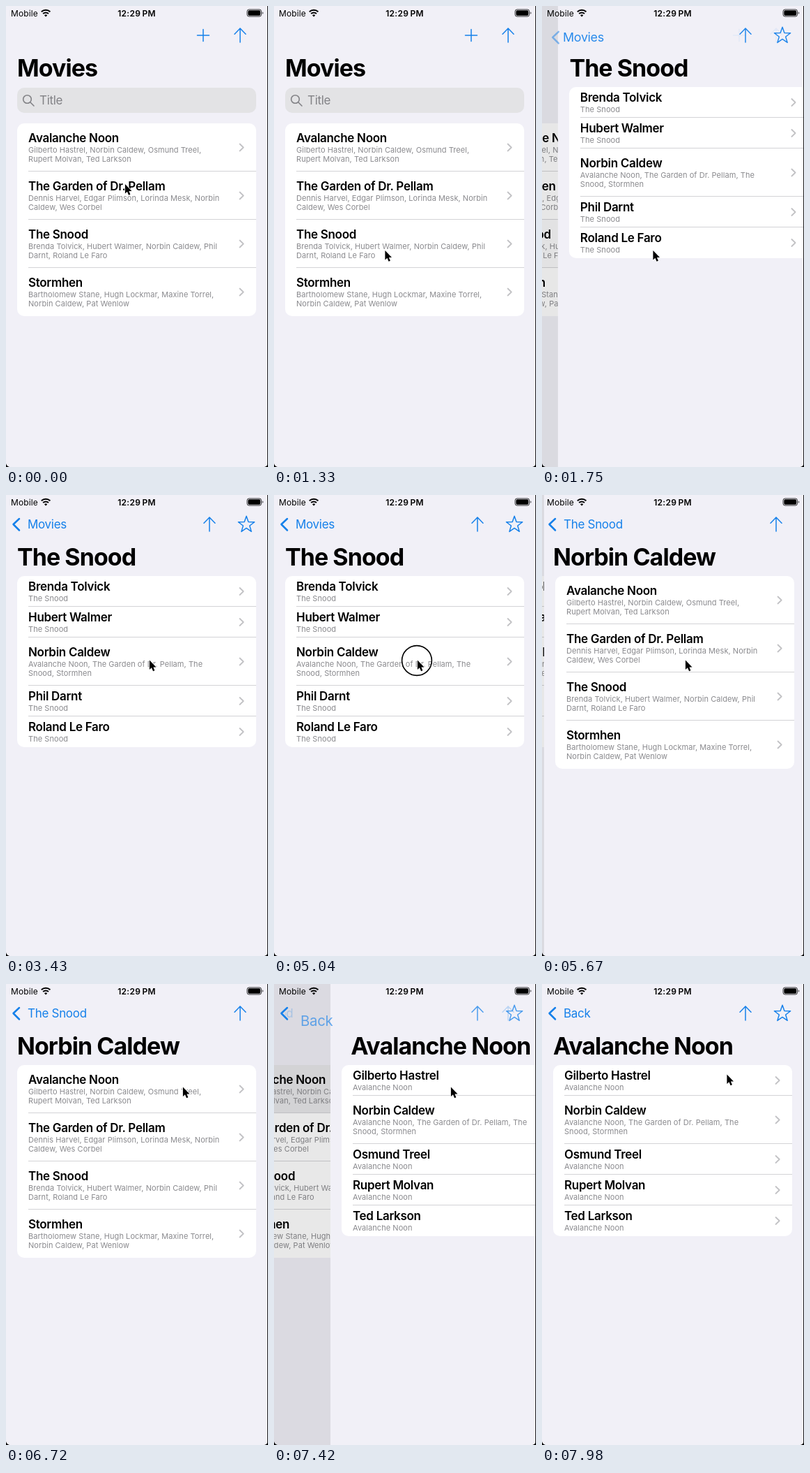
An HTML page that plays this animation: 376 by 660 pixels, repeating every 8000 ms.

```html
<!DOCTYPE html>
<html lang="en">
<head>
<meta charset="utf-8">
<title>Movie list</title>
<style>
  html, body { margin: 0; width: 100%; height: 100%; overflow: hidden; background: #f1f0f7; }
  svg { display: block; width: 376px; height: 660px; }
  text { font-family: Inter, Roboto, "Liberation Sans", sans-serif; font-optical-sizing: none; }
  .title { font-size: 34px; font-weight: 700; letter-spacing: -.95px; }
  .name { font-size: 17px; font-weight: 600; letter-spacing: -.3px; }
  .sub { font-size: 11px; fill: #8a8a8e; letter-spacing: .06px; }
  .label { font-size: 17px; fill: #1580ea; letter-spacing: -.3px; }
  .hint { font-size: 17px; fill: #828286; letter-spacing: -.3px; }
  .status { font-size: 12px; letter-spacing: .1px; }
  .line { fill: none; stroke: #1580ea; stroke-width: 1.5; stroke-linecap: round; stroke-linejoin: round; }
</style>
</head>
<body>
<svg id="stage" viewBox="0 0 376 660" xmlns="http://www.w3.org/2000/svg"></svg>
<script>
const LOOP = 8000, STEP = 70, WIDTH = 375;

const films = [
  ["Avalanche Noon", "Gilberto Hastrel, Norbin Caldew, Osmund Treel,", "Rupert Molvan, Ted Larkson"],
  ["The Garden of Dr. Pellam", "Dennis Harvel, Edgar Plimson, Lorinda Mesk, Norbin", "Caldew, Wes Corbel"],
  ["The Snood", "Brenda Tolvick, Hubert Walmer, Norbin Caldew, Phil", "Darnt, Roland Le Faro"],
  ["Stormhen", "Bartholomew Stane, Hugh Lockmar, Maxine Torrel,", "Norbin Caldew, Pat Wenlow"]
];
const lead = ["Norbin Caldew", "Avalanche Noon, The Garden of Dr. Pellam, The", "Snood, Stormhen"];
const cast = (film, names) => names.map(n => n === lead[0] ? lead : [n, film]);

// start: when the page is pushed; picked: row tapped on it; drift: label offset while shrinking
const pages = [
  { title: "Movies", start: -1e4, rows: films, top: 168, picked: 2, icons: [["plus", 283], ["arrow", 336]] },
  { title: "The Snood", start: 1560, top: 116, picked: 2, back: "Movies", drift: -15,
    rows: cast("The Snood", ["Brenda Tolvick", "Hubert Walmer", lead[0], "Phil Darnt", "Roland Le Faro"]),
    icons: [["arrow", 292], ["star", 345]] },
  { title: lead[0], start: 5379, rows: films, top: 116, picked: 0, back: "The Snood", drift: 0,
    icons: [["arrow", 336]] },
  { title: "Avalanche Noon", start: 7298, top: 116, back: "Back", drift: 28,
    rows: cast("Avalanche Noon", ["Gilberto Hastrel", lead[0], "Osmund Treel", "Rupert Molvan", "Ted Larkson"]),
    icons: [["arrow", 292], ["star", 345]] }
];

const taps = [
  { at: 1260, hold: 70, x: 158.5, y: 349.5 },
  { at: 5040, hold: 140, x: 205, y: 237 },
  { at: 7000, hold: 140, x: 253, y: 147 }
];
const moves = [
  { from: 0, to: 770, x: 159, y: 349.5 },
  { from: 2800, to: 3430, x: 205.5, y: 236 },
  { from: 6230, to: 6720, x: 253.5, y: 147 },
  { from: 7490, to: 7980, x: 265, y: 129 }
];

const text = (cls, x, y, s) => `<text class="${cls}" x="${x}" y="${y}">${s}</text>`;

function starPath() {
  const points = [];
  for (let i = 0; i < 10; i++) {
    const r = i % 2 ? 4.9 : 12.2, a = -Math.PI / 2 + i * Math.PI / 5;
    points.push((r * Math.cos(a)).toFixed(2) + " " + (r * Math.sin(a)).toFixed(2));
  }
  return "M" + points.join("L") + "Z";
}
const shapes = {
  plus: "M-8.5 0H8.5M0 -8.5V8.5",
  arrow: "M0 10V-10M-8 -1.8L0 -10L8 -1.8",
  star: starPath()
};
const icon = ([kind, x]) =>
  `<path class="line" d="${shapes[kind]}" transform="translate(${x} ${kind === "star" ? 42.5 : 42})"/>`;

function search() {
  return `<g id="search"><rect x="16" y="117" width="343" height="36" rx="10" fill="#e3e3e5"/>
    <g fill="none" stroke="#828286" stroke-width="1.6" stroke-linecap="round">
    <circle cx="30.5" cy="133.5" r="5.8"/><path d="M34.8 137.8L40 143"/></g>${text("hint", 48, 141, "Title")}</g>`;
}

function body(page, i) {
  let y = page.top, out = "", glow = "";
  page.rows.forEach(([name, ...subs], k) => {
    const tall = subs.length > 1, h = tall ? 69 : 44, base = y + (tall ? 27 : 21);
    if (k === page.picked) glow = `<rect class="glow" x="16" y="${y}" width="343" height="${h}" fill="#d1d1d6" clip-path="url(#card${i})"/>`;
    if (k) out += `<path d="M32 ${y - .5}H359" stroke="#d3d3d6"/>`;
    out += text("name", 32, base, name);
    subs.forEach((s, n) => out += text("sub", 32, base + 15 + 13 * n, s));
    out += `<path d="M335.5 ${y + h / 2 - 5}l5.2 5l-5.2 5" fill="none" stroke="#c2c2c5" stroke-width="1.8" stroke-linecap="round" stroke-linejoin="round"/>`;
    y += h;
  });
  const card = `x="16" y="${page.top}" width="343" height="${y - page.top}" rx="10"`;
  return `<g class="body"><rect width="376" height="660" fill="#f1f0f7"/>
    <clipPath id="card${i}"><rect ${card}/></clipPath><rect ${card} fill="#fff"/>
    ${glow}${i ? "" : search()}${out}<rect class="dim" width="376" height="660"/></g>`;
}

const bar = page => `<g class="icons">${page.icons.map(icon).join("")}</g>
  ${text("title", 0, 0, page.title)}
  <g clip-path="url(#barClip)">${text("label", 0, 0, page.back || "")}</g>`;

const statusBar = `${text("status", 7, 14.5, "Mobile")}
  <text class="status" x="187.5" y="14.5" text-anchor="middle" font-weight="600" style="letter-spacing:.3px">12:29\u2009PM</text>
  <g fill="none" stroke="#000" stroke-width="2"><path d="M50.8 8.3a9 9 0 0 1 12.6 0M53.2 11a5.6 5.6 0 0 1 7.8 0"/></g>
  <path d="M57.1 15.4l-2.1-2.2a3 3 0 0 1 4.2 0z"/>
  <rect x="346" y="5" width="20.5" height="10" rx="2.8" fill="none" stroke="#000" stroke-opacity=".8"/>
  <rect x="347.3" y="6.3" width="17.9" height="7.4" rx="1.6"/>
  <path d="M367.8 8.2q1.6.5 1.6 1.8t-1.6 1.8z" fill-opacity=".6"/>`;

const stage = document.getElementById("stage");
stage.innerHTML = `<clipPath id="barClip"><rect x="16" width="360" height="120"/></clipPath>
  ${pages.map(body).join("")}${pages.map(bar).join("")}
  <path id="chevron" class="line" style="stroke-width:2.5" d="M19 34L10.5 42L19 50.5"/>
  ${statusBar}
  <path d="M375.5 0V660" stroke="#1c1c1e" stroke-width="1"/>
  <path d="M0 655V660H5Q1 659 0 655ZM376 655V660H371Q375 659 376 655Z"/>
  <circle id="ring" r="21.4" fill="none" stroke="#000" stroke-width="1.6"/>
  <path id="cursor" d="M.4 .6V14.1L3.4 11.3L5.6 16.2L7.9 15.2L5.9 10.4H10Z" stroke="#fff" stroke-width="1.6" paint-order="stroke"/>`;

const all = cls => [...stage.querySelectorAll("." + cls)];
const bodies = all("body"), dims = all("dim"), titles = all("title"), labels = all("label"), icons = all("icons"), glows = all("glow");
const [chevron, ring, cursor, field] = ["chevron", "ring", "cursor", "search"].map(id => document.getElementById(id));

const clamp = v => Math.max(0, Math.min(1, v));
const smooth = v => v * v * (3 - 2 * v);

function place(el, alpha, x = 0, y = 0, scale = 1) {
  el.style.display = alpha > 0 ? "" : "none";
  el.setAttribute("opacity", alpha);
  el.setAttribute("transform", `translate(${x} ${y}) scale(${scale})`);
}

function render(t) {
  const now = pages.filter(p => p.start <= t).length - 1;
  const age = t - pages[now].start, k = age * .0237;
  const left = (1 + k) * Math.exp(-k);                  // page slide, 1 to 0
  const rest = (1 - clamp((age - 15) / 290)) ** 3;      // bar change, 1 to 0
  const shown = clamp(1 - 1.5 * rest);

  pages.forEach((page, i) => {
    const isNew = i === now, isOld = i === now - 1;
    place(bodies[i], +(isNew || isOld), isNew ? WIDTH * left : -112 * (1 - left));
    dims[i].setAttribute("opacity", isOld ? .095 * (1 - left * left) : 0);
    if (glows[i]) {
      const pressed = +(t >= pages[i + 1].start - 20);
      glows[i].setAttribute("opacity", isOld ? clamp(2 * rest) : pressed);
    }
    place(icons[i], isNew ? 1 - rest : isOld ? rest : 0);
    if (isNew) {
      place(titles[i], 1, 16 + WIDTH * rest, 100.5);
      place(labels[i], page.back ? shown : 0, 31 + page.drift * rest, 48 + 46 * rest, 1 + .8 * rest);
    } else {
      const u = 1 - rest;
      place(titles[i], isOld ? clamp((rest - .4) / .6) : 0, 16 + 15 * u, 100.5 - 52.5 * u, 1 - u / 2);
      place(labels[i], isOld && page.back ? rest : 0, 31 - 118 * u, 48);
    }
  });

  place(field, now ? clamp((rest - .1) / .9) : 1);
  const first = now === 1 ? rest : 0;
  place(chevron, now ? clamp(1 - 8 * first) : 0, 76 * first, 46 * first);

  const tap = taps.find(p => t >= p.at && t < p.at + p.hold);
  place(ring, tap ? (t < tap.at + STEP ? 1 : .4) : 0, tap ? tap.x : 0, tap ? tap.y : 0);

  let x = 170.5, y = 254.5;
  for (const m of moves) {
    const u = smooth(clamp((t - m.from) / (m.to - m.from)));
    x += (m.x - x) * u;
    y += (m.y - y) * u;
  }
  place(cursor, 1, x, y);
}

const begin = performance.now();
function tick() {
  const t = (performance.now() - begin) % LOOP;
  render(Math.floor(t / STEP) * STEP);
  requestAnimationFrame(tick);
}
tick();
</script>
</body>
</html>
```
